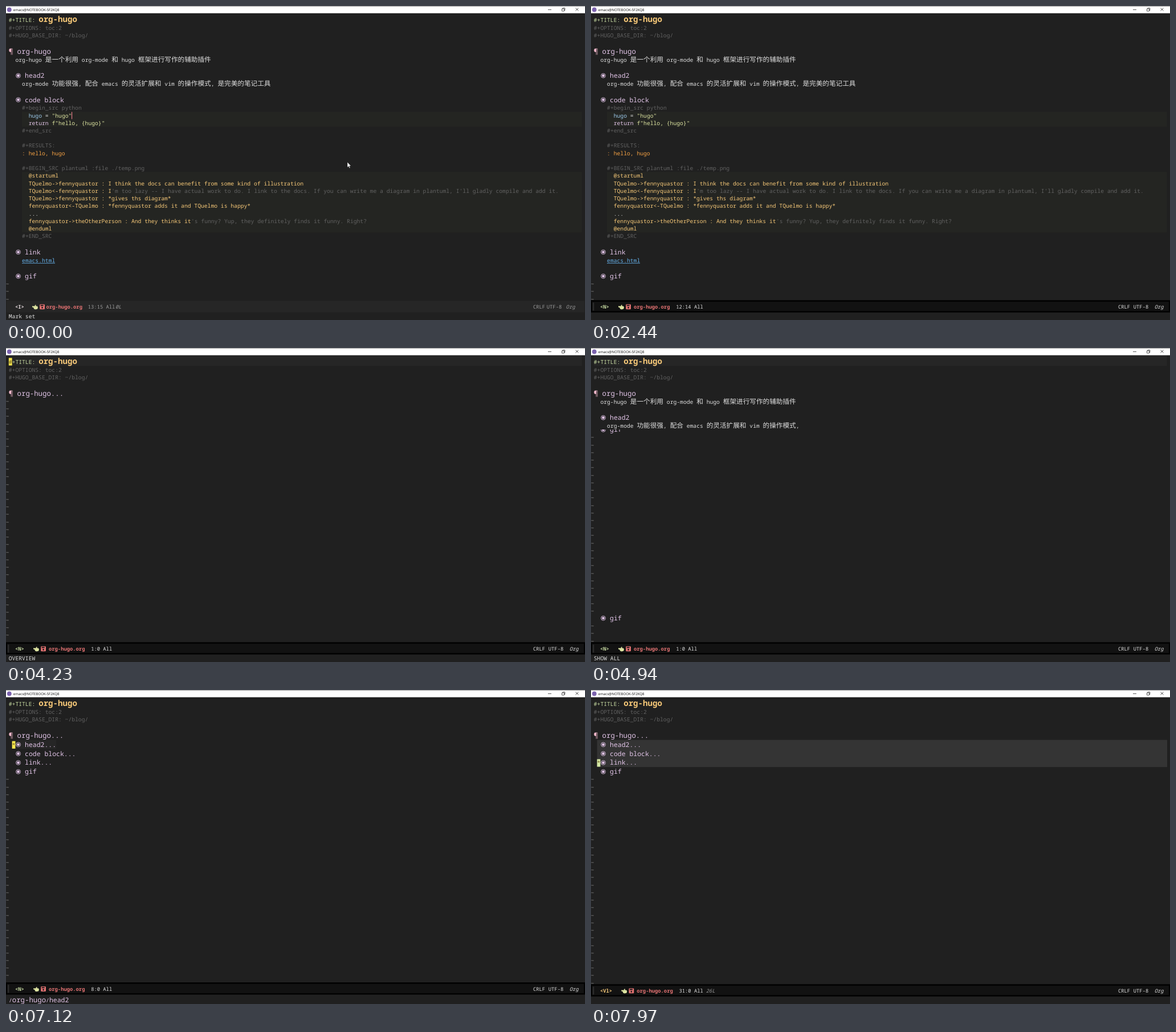
An HTML page for the animation above (8000 ms loop, 1016 by 551 pixels).

```html
<!DOCTYPE html>
<html lang="zh">
<head>
<meta charset="utf-8">
<title>org-hugo</title>
<style>
html, body { margin: 0; width: 100%; height: 100%; overflow: hidden; background: #202020; }
svg { display: block; width: 100%; height: 100%; }
text { font-family: "Noto Sans Mono", "Noto Sans CJK SC", monospace; white-space: pre; text-rendering: geometricPrecision; }
.cjk { font-family: "Noto Sans CJK SC", "Noto Sans CJK", sans-serif; font-weight: 300; }
.bar { font-family: "Open Sans", "Noto Sans", sans-serif; }
.bold { font-weight: 700; }
.italic { font-style: italic; }
</style>
</head>
<body>
<svg id="stage" viewBox="0 0 1016 551"></svg>
<script>
const LOOP = 8000, LEFT = 4.8, COL = 5.82, ROW = 13.23, HEAD = 15.87;
const BODY = 9.7, H2 = 11.47, H1 = 12.35, TITLE = 14.1, MODE = 8.82;
const FULL_TAIL = 423.6, LIST_TOP = 87.6;
const C = {
  bg: '#202020', line: '#262626', block: '#242522', text: '#dedede', dim: '#616161', gray: '#9a9a9a',
  key: '#c5d8a0', orange: '#f6c878', warm: '#f2a043', lilac: '#e1c4e7', pink: '#f3b9cc',
  blue: '#9cc9ea', green: '#dce3a0', link: '#64aee6', red: '#e57373', yellow: '#f9e84e', lime: '#d5e8a4'
};

const esc = s => s.replace(/&/g, '&amp;').replace(/</g, '&lt;');
const rect = (x, y, w, h, fill) => `<rect x="${x}" y="${y}" width="${w}" height="${h}" fill="${fill}"/>`;
const path = (d, attrs) => `<path d="${d}" ${attrs}/>`;
const column = n => LEFT + n * COL;

// Ideographs take two columns each.
function text(x, y, str, fill, size = BODY, cls = '') {
  return str.match(/[\u4e00-\u9fff]+|[^\u4e00-\u9fff]+/g).map(part => {
    const wide = part[0] >= '\u4e00';
    const em = wide ? size * 1.2 : size;
    const out = `<text x="${x.toFixed(2)}" y="${y}" font-size="${em}" fill="${fill}" class="${wide ? 'cjk' : cls}">${esc(part)}</text>`;
    x += part.length * size * (wide ? 1.2 : 0.6);
    return out;
  }).join('');
}

// A body row: alternating colour names and strings.
function row(col, top, ...runs) {
  let out = '';
  for (let i = 0; i < runs.length; i += 2) {
    out += text(column(col), +(top + 10.05).toFixed(2), runs[i + 1], C[runs[i]]);
    col += runs[i + 1].length;
  }
  return out;
}

function heading(top, label) {
  const y = top + 8.2;
  return `<circle cx="21.5" cy="${y}" r="3.9" fill="none" stroke="${C.lilac}" stroke-width=".9"/>` +
    `<circle cx="21.5" cy="${y}" r="2.4" fill="${C.lilac}"/>` + text(33, top + 12.1, label, C.lilac, H2);
}

function tildes(top, skip = -1) {
  let out = '';
  for (let i = 0, y = top; y < 510; i++, y += ROW)
    if (i !== skip) out += text(0, y + 9.4, '~', C.gray, 8.8);
  return out;
}

function windowBar() {
  const icon = 'fill="none" stroke="#333" stroke-width=".8"';
  return rect(0, 0, 1016, 12.7, '#fff') + rect(0, 0, 1016, 0.6, '#555') +
    '<circle cx="5.8" cy="6.5" r="3.9" fill="#7b62ae"/>' +
    '<text class="bar" x="12.8" y="9" font-size="6.1" fill="#111">emacs@NOTEBOOK-5F2KQ8</text>' +
    path('M951 6.5h6M975.5 5h4v4h-4zM976.8 5v-1.4h4v4h-1.3M999.5 3.5l5 5M1004.5 3.5l-5 5', icon);
}

const preamble = folded =>
  text(LEFT, 27.5, '#+TITLE:', C.key) + text(57.2, 27.5, 'org-hugo', C.orange, TITLE, 'bold') +
  row(0, 31.5, 'dim', '#+OPTIONS: toc:2') + row(0, 44.7, 'dim', '#+HUGO_BASE_DIR: ~/blog/') +
  text(LEFT, 84, '¶', C.pink, H1) + text(19.6, 84, folded ? 'org-hugo...' : 'org-hugo', C.lilac, H1);

const intro = cut =>
  row(2, LIST_TOP, 'text', 'org-hugo 是一个利用 org-mode 和 hugo 框架进行写作的辅助插件') +
  heading(114.05, 'head2') +
  row(4, 129.9, 'text', 'org-mode 功能很强, 配合 emacs 的灵活扩展和 vim 的操作模式,' + (cut ? '' : ' 是完美的笔记工具'));

function codeBlocks() {
  const uml = 291.3, at = n => uml + n * ROW;
  const a = 'TQuelmo', b = 'fennyquastor';
  return rect(28, 185.5, 982.5, 2 * ROW, C.block) + rect(28, uml, 982.5, 8 * ROW, C.block) +
    heading(156.4, 'code block') +
    row(4, 172.2, 'dim', '#+begin_src python') +
    row(6, 185.5, 'blue', 'hugo', 'text', ' = ', 'green', '"hugo"') +
    row(6, 198.7, 'lilac', 'return ', 'green', 'f"hello, {hugo}"') +
    row(4, 211.9, 'dim', '#+end_src') +
    row(4, 238.4, 'dim', '#+RESULTS:') +
    row(4, 251.6, 'warm', ': hello, hugo') +
    row(4, 278.1, 'dim', '#+BEGIN_SRC plantuml :file ./temp.png') +
    row(6, at(0), 'orange', '@startuml') +
    row(6, at(1), 'orange', `${a}->${b} : I think the docs can benefit from some kind of illustration`) +
    row(6, at(2), 'orange', `${a}<-${b} : I`, 'dim', "'m too lazy -- I have actual work to do. I link to the docs. If you can write me a diagram in plantuml, I'll gladly compile and add it.") +
    row(6, at(3), 'orange', `${a}->${b} : *gives ths diagram*`) +
    row(6, at(4), 'orange', `${b}<-${a} : *${b} adds it and ${a} is happy*`) +
    row(6, at(5), 'text', '...') +
    row(6, at(6), 'orange', `${b}->theOtherPerson : And they thinks it`, 'dim', "'s funny? Yup, they definitely finds it funny. Right?") +
    row(6, at(7), 'orange', '@enduml') +
    row(4, at(8), 'dim', '#+END_SRC');
}

const lastHeading = () => heading(465.9, 'gif');
const tail = () => heading(FULL_TAIL, 'link') + row(4, 439.5, 'link', 'emacs.html') +
  rect(28, 451.2, 58, 0.8, C.link) + lastHeading() + tildes(481.8);

const listTop = i => LIST_TOP + i * HEAD;
const outline = () =>
  ['head2...', 'code block...', 'link...', 'gif'].map((s, i) => heading(listTop(i), s)).join('') + tildes(listTop(4));

const views = {
  full: () => preamble() + intro() + codeBlocks() + tail(),
  folding: () => preamble(true) + tail(),
  overview: () => preamble(true) + tildes(LIST_TOP),
  contents: () => preamble(true) + outline(),
  unfolding: () => preamble() + heading(listTop(3), 'gif') + rect(5, 129.9, 400, ROW, C.bg) + intro(true) +
    lastHeading() + tildes(listTop(4), 24)
};

function modeLine(s) {
  const idle = s.idle, info = idle ? C.gray : C.text;
  const shift = (s.mode.length - 1) * MODE * 0.6;
  const [icon, file, pos] = idle ? [46, 70.5, 143.8] : [48 + shift, 75 + shift, 149.2 + shift];
  const disk = icon + 13.2, y = 531.2;
  const modeColor = { I: '#eadfe2', N: C.key, Vl: C.orange }[s.mode];
  const frame = idle ? rect(1, 517.3, 1014, 20.5, C.line)
    : rect(0, 516.3, 1016, 21.6, '#000') + rect(2, 518.8, 1012, 16.6, '#121212') + rect(3, 520.5, 2.4, 14, '#2b2b2b');
  const hand = path(`M${icon} 526.6l4 .2 1.5-2.6 1.2.5-.5 1.8 3 .3.8 2.6-1 2.4-3.6.6-2.4-.8-.6-2.4-2.4-.8z`, `fill="${C.green}"`);
  const floppy = `<rect x="${disk}" y="523.4" width="8.8" height="8.8" rx="1.2" fill="${C.red}"/>` +
    rect(disk + 1.5, 524.6, 5, 2, '#181818') + `<circle cx="${disk + 4.4}" cy="529.4" r="1.4" fill="#181818"/>`;
  const where = s.pos + ' All';
  return `<g transform="translate(0 ${s.path ? -3.2 : 0})">` + frame + rect(0, 537.8, 1016, 17, C.bg) +
    text(16, y, `<${s.mode}>`, modeColor, MODE, 'bold') + hand + floppy +
    text(file, y, 'org-hugo.org', C.red, MODE, 'bold') + text(pos, y, where, info, MODE) +
    (s.lines ? text(pos + (where.length + (idle ? 0 : 0)) * MODE * 0.6 + (idle ? 0.6 : 5), y, s.lines, C.gray, MODE, 'italic') : '') +
    text(925, y, 'CRLF', info, MODE) + text(idle ? 948.8 : 951.8, y, 'UTF-8', info, MODE) +
    text(idle ? 982.6 : 988.8, y, 'Org', info, MODE, 'italic') + '</g>';
}

function cursor(s) {
  if (s.beam) return rect(115, 185.8, 1.1, 12.6, '#ee7d8c');
  if (!s.at) return '';
  const [col, base, glyph] = s.at, fill = s.mode === 'Vl' ? C.lime : C.yellow;
  return rect(column(col), base - 10.05, COL, ROW, fill) + (glyph ? text(column(col), base, glyph, '#6b5a20') : '');
}

const echo = s => s.path
  ? text(5, 547.5, '/', C.lilac) + text(10.8, 547.5, 'org-hugo', C.lilac, H1) +
    text(70.1, 547.5, '/', C.lilac) + text(75.9, 547.5, 'head2', C.lilac, H2)
  : s.echo ? text(LEFT, 548.3, s.echo, C.text) : '';

function draw(s) {
  const pointer = s.mouse ? path('M599 274v9.2l2.1-1.9 1.5 3.2 1.4-.6-1.5-3.1h2.9z', 'fill="#fff" stroke="#111" stroke-width=".4"') : '';
  const titleRow = s.pos === '1:0' ? rect(5, 12.7, 1005.5, 18.8, C.line) : '';
  const headRow = s.pos === '8:0' && !s.picked ? rect(16.4, LIST_TOP, 71.6, HEAD, C.line) : '';
  const region = s.picked ? rect(column(1), LIST_TOP, 1000.4, s.picked * HEAD, '#343434') : '';
  return rect(0, 0, 1016, 551, C.bg) + titleRow + headRow + region + views[s.view]() +
    cursor(s) + modeLine(s) + echo(s) + windowBar() + pointer;
}

const starAt = i => [1, +(listTop(i) + 12.1).toFixed(2), '*'];
const home = [0, 27.5, '#'];

// Each step changes only the listed properties.
const steps = [
  [0, { view: 'full', beam: true, mode: 'I', pos: '13:15', lines: '0L', echo: 'Mark set', mouse: true, idle: true }],
  [70, { idle: false, lines: '' }],
  [490, { beam: false, mouse: false, echo: '' }],
  [1350, { beam: true }],
  [1430, { beam: false, mode: 'N', at: [18, 195.5, '"'] }],
  [1500, { pos: '13:14' }],
  [1730, { pos: '12:14', at: [18, 182.3, 't'] }],
  [2280, { at: null }],
  [2920, { pos: '20:0', at: [4, 288.2, '#'] }],
  [3470, { pos: '16:0', at: [4, 235.2, ''] }],
  [3620, { pos: '1:0', at: home }],
  [4160, { view: 'folding', echo: 'OVERVIEW' }],
  [4230, { view: 'overview' }],
  [4630, { view: 'contents', echo: 'CONTENTS' }],
  [4940, { view: 'unfolding', echo: 'SHOW ALL', at: null }],
  [5010, { view: 'full', at: home }],
  [5410, { view: 'folding', echo: 'OVERVIEW' }],
  [5480, { view: 'overview' }],
  [5640, { view: 'contents', echo: 'CONTENTS' }],
  [6020, { pos: '2:0', at: [0, 41.55, '#'], echo: '' }],
  [6490, { pos: '5:0', at: [0, 84, '¶'] }],
  [6570, { pos: '8:0', at: starAt(0) }],
  [7120, { path: true }],
  [7670, { path: false, mode: 'Vl', picked: 1, lines: '3L' }],
  [7740, { pos: '11:0', at: starAt(1), picked: 2, lines: '23L' }],
  [7970, { pos: '31:0', at: starAt(2), picked: 3, lines: '26L' }]
];
let state = {};
const scenes = steps.map(([time, change]) => ({ time, svg: draw(state = { ...state, ...change }) }));

const stage = document.getElementById('stage');
let shown = null;
function tick() {
  const t = performance.now() % LOOP;
  const scene = scenes.findLast(s => s.time <= t);
  if (scene !== shown) stage.innerHTML = (shown = scene).svg;
  requestAnimationFrame(tick);
}
tick();
</script>
</body>
</html>
```
